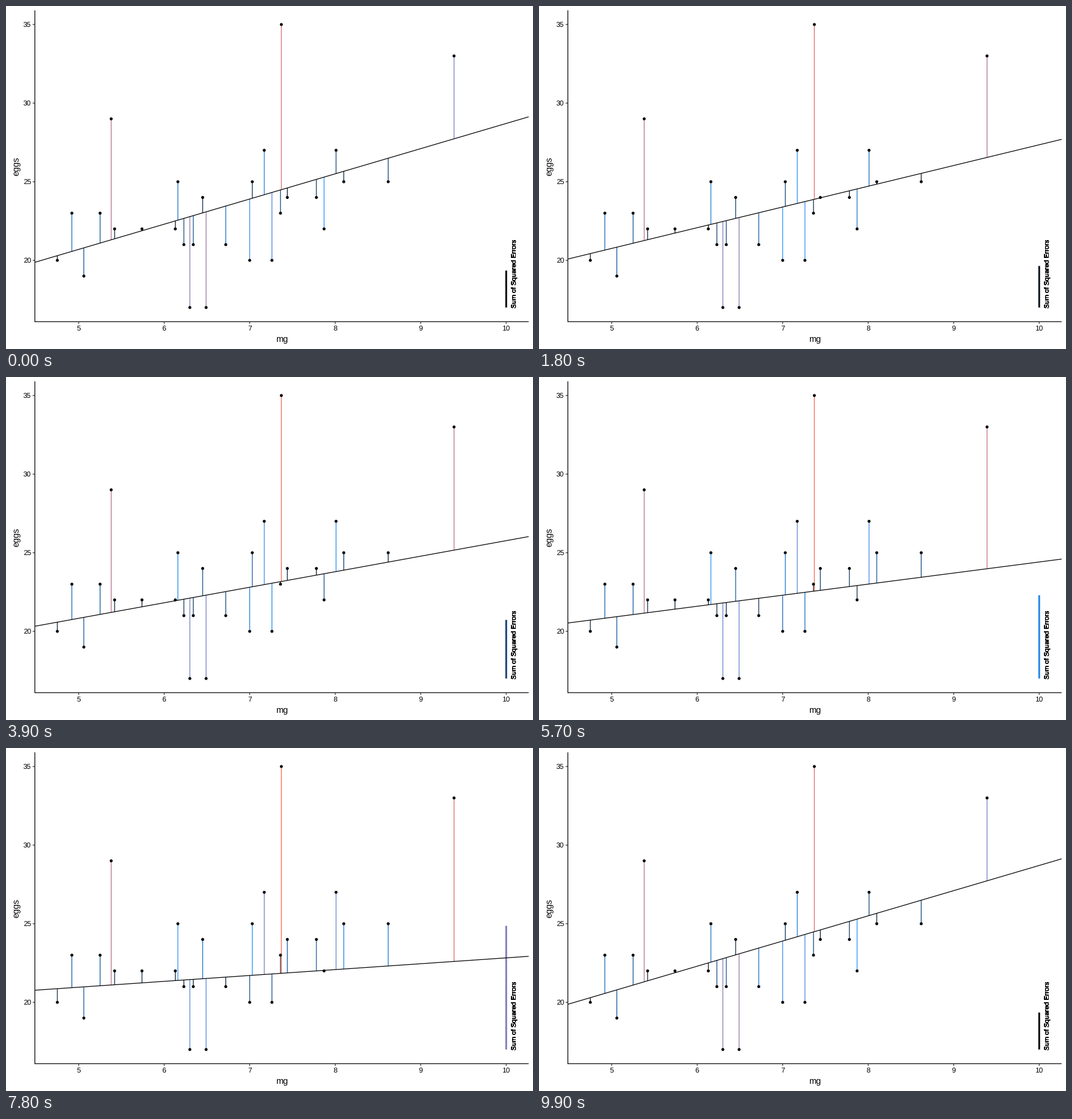
A matplotlib script for the animation above (10 s loop, 883 by 576 pixels).

```python
import numpy as np
import matplotlib.pyplot as plt
from matplotlib.animation import FuncAnimation
from matplotlib.collections import LineCollection
from matplotlib.colors import LinearSegmentedColormap
from matplotlib.patches import Circle

plt.rcParams["font.family"] = "Liberation Sans"
plt.rcParams["text.hinting"] = "none"

WIDTH, HEIGHT, DPI = 883, 576, 100
PX = 72 / DPI  # points per pixel
LEFT, RIGHT, TOP, BOTTOM = 48.4, 875.7, 7.3, 530.1
FRAMES, DESCENT = 100, 89
LINE = 1.25
BAR_X, BAR_BASE, BAR_START, ERROR_UNIT = 10, 17, 2.35, 27

# Observations: weights in mg for each egg count
WEIGHTS = {
    17: [6.30, 6.49], 19: [5.06], 20: [4.75, 7.00, 7.26],
    21: [6.23, 6.34, 6.72], 22: [5.42, 5.74, 6.13, 7.87],
    23: [4.92, 5.25, 7.36], 24: [6.45, 7.44, 7.78],
    25: [6.16, 7.03, 8.10, 8.62], 27: [7.17, 8.01],
    29: [5.38], 33: [9.39], 35: [7.37],
}
mg, eggs = np.array([(weight, count) for count, weights in WEIGHTS.items()
                     for weight in weights]).T

best_fit = np.polyfit(mg, eggs, 1)  # slope, intercept
POOR_FIT = np.array([0.2, 20.0])
least_error = np.sum((eggs - np.polyval(best_fit, mg)) ** 2)

ERROR_MAX = 13
error_map = LinearSegmentedColormap.from_list(
    "error", ["black", "dodgerblue", "#a57096", "#cd6e73", "tomato"])


def padded(low, high, share=0.05):
    margin = (high - low) * share
    return low - margin, high + margin


x_limits = padded(mg.min(), BAR_X)
y_limits = padded(eggs.min(), eggs.max())


def px(x):
    return np.interp(x, x_limits, (LEFT, RIGHT))


def py(y):
    return np.interp(y, y_limits, (BOTTOM, TOP))


fig = plt.figure(figsize=(WIDTH / 100, HEIGHT / 100), dpi=DPI, facecolor="white")
ax = fig.add_axes([0, 0, 1, 1])
ax.set_xlim(0, WIDTH)
ax.set_ylim(HEIGHT, 0)
ax.axis("off")


def stroke(xs, ys, width=LINE, color="black", **kwargs):
    return ax.plot(xs, ys, color=color, lw=width * PX, snap=False,
                   solid_capstyle="butt", **kwargs)[0]


def label(x, y, text, size, ha="center", rotation=0):
    ax.text(x, y, text, size=size * PX, ha=ha, va="baseline",
            rotation=rotation, rotation_mode="anchor")


# Axes, ticks and titles
stroke([LEFT, LEFT], [TOP, BOTTOM + LINE / 2])
stroke([LEFT, RIGHT], [BOTTOM, BOTTOM])
for tick in range(5, 11):
    stroke([px(tick)] * 2, [BOTTOM, BOTTOM + 3.7], color="#333333")
    label(px(tick), 544.7, str(tick), 11.9)
for tick in range(20, 36, 5):
    stroke([LEFT - 3.7, LEFT], [py(tick)] * 2, color="#333333")
    label(42.2, py(tick) + 4.1, str(tick), 11.9, ha="right")
label((LEFT + RIGHT) / 2, 564, "mg", 14.67)
label(21, (TOP + BOTTOM) / 2, "eggs", 14.67, rotation=90)

# Stacked copies thicken the antialiased edges
for _ in range(12):
    label(855.3, py(BAR_BASE) + 0.3, "Sum of Squared Errors", 11.2,
          ha="left", rotation=90)

residuals = LineCollection([], linewidths=LINE * PX, zorder=2, snap=False,
                           capstyle="butt")
ax.add_collection(residuals, autolim=False)
error_bar = stroke([px(BAR_X)] * 2, [py(BAR_BASE)] * 2, 2.9, zorder=3)
fit_line = stroke([LEFT, RIGHT], [0, 0], zorder=4)
for center in zip(px(mg), py(eggs)):
    ax.add_patch(Circle(center, 2.5, color="black", lw=0, zorder=5))


def update(frame):
    if frame <= DESCENT:
        drift = frame / DESCENT
    else:
        drift = (FRAMES - 1 - frame) / (FRAMES - 2 - DESCENT)
    fit = best_fit + (POOR_FIT - best_fit) * drift

    fitted = np.polyval(fit, mg)
    errors = eggs - fitted
    residuals.set_segments([[(x, a), (x, b)]
                            for x, a, b in zip(px(mg), py(eggs), py(fitted))])
    residuals.set_color(error_map(np.abs(errors) / ERROR_MAX))
    fit_line.set_ydata(py(np.polyval(fit, x_limits)))

    growth = (np.sum(errors ** 2) - least_error) / ERROR_UNIT
    error_bar.set_ydata(py([BAR_BASE, BAR_BASE + BAR_START + growth]))
    error_bar.set_color(error_map(growth / ERROR_MAX))
    return residuals, error_bar, fit_line


animation = FuncAnimation(fig, update, frames=FRAMES, interval=100,
                          repeat=True, repeat_delay=0, blit=False)
plt.show()
```
